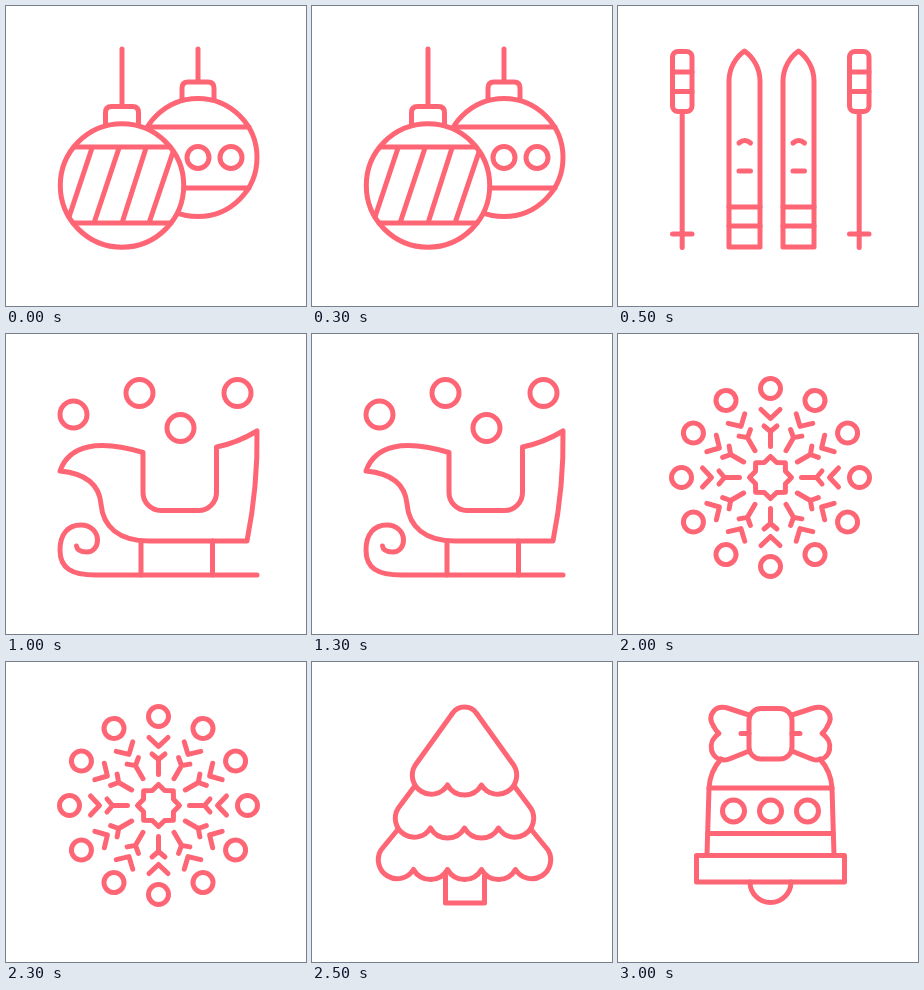
Recreate the animation shown at these times as an HTML page. Size 300 px wide and 300 px high, loop 3500 ms.

```html
<!DOCTYPE html>
<html lang="en">
<head>
<meta charset="utf-8">
<title>Winter icons</title>
<style>
html, body { margin: 0; width: 100%; height: 100%; overflow: hidden; background: #fff; }
svg { display: block; width: 100%; height: 100%; }
</style>
</head>
<body>
<svg id="stage" viewBox="0 0 300 300" fill="none" stroke="#ff6675" stroke-width="5"
  stroke-linecap="round" stroke-linejoin="round"></svg>
<script>
const HOLD = 500;
const MID = 152.5;

const path = (d, extra = '') => `<path d="${d}" ${extra}/>`;
const circle = (x, y, r, extra = '') => `<circle cx="${x}" cy="${y}" r="${r}" ${extra}/>`;
const rect = (x, y, w, h, r = 0) => `<rect x="${x}" y="${y}" width="${w}" height="${h}" rx="${r}"/>`;
const shift = (s, dx) => `<g transform="translate(${dx} 0)">${s}</g>`;
const both = s => s + `<g transform="translate(${2 * MID} 0) scale(-1 1)">${s}</g>`;

function baubles() {
  const cap = (x, y, w) =>
    path(`M${x} 43V${y}M${x - w} ${y + 18}V${y + 6}q0-6 6-6h${2 * w - 12}q6 0 6 6v12`);
  const back = circle(192, 151.5, 59) + cap(192, 76, 16) +
    path('M142 121H243M179 182H243') +
    circle(192, 151.5, 11) + circle(225, 151.5, 11);
  const front = circle(116, 179.5, 61.7, 'fill="#fff"') + cap(116, 100.5, 16.5) +
    path('M68 141H164M67 217H165M86 142L63 211M113 142L88 217M140 142L116 217M167 146L143 217');
  return back + front;
}

function skis() {
  const pole = rect(54.5, 45.5, 19.5, 60, 5.5) +
    path('M54.5 66H74M54.5 85.5H74M64.2 106V241.5M54.5 228H74');
  const ski = path('M111 241V75C111 62 118 51 126.5 45C135 51 142 62 142 75V241Z') +
    path('M111 201H142M111 220H142M121 165H132.5M121 137Q126.7 132 132.5 137');
  return pole + shift(pole, 177) + ski + shift(ski, 54);
}

function sleigh() {
  const balls = [[67.5, 80.5], [133.5, 59], [231.5, 59], [174.5, 94]];
  return balls.map(([x, y]) => circle(x, y, 13.5)).join('') +
    path('M54 137C63 111 92 105 137 118.5V158a18 18 0 0 0 18 18.5H192a18 18 0 0 0 18.5-18.5V113Q231 109 251 97Q252 152 241 207H143C113 207 97 193 95 170C93 148 76 139 54 137Z') +
    path('M251 241H90C65 241 54 234 54 216C54 200 62 191 75 191C85 191 91.5 198 91.5 206C91.5 213 87 218 81 218C75 218 71 216 70.5 212') +
    path('M135 207V241M206.5 207V241');
}

function reindeer() {
  const side =
    path('M102 115Q85 103 54 111C63 127 73 136 93 134') +
    path('M116 97Q107 88 105.5 77L120 71.5C129 67 124 52 114 57L102.500 64.500V54a9 9 0 0 0-18 0L88 69L77 65.500C66 63 61 77 73 79.500L90 82L94 94L79 94C70 95 67 102 73 106') +
    path('M117 141a10.700 10.700 0 0 1 21.400 0');
  return both(side) +
    path('M152.5 84C191 84 221 135 221 174C221 215 190 241.5 152.5 241.5C115 241.5 84 215 84 174C84 135 114 84 152.5 84Z') +
    circle(MID, 188.5, 16);
}

function snowflake() {
  const arm = circle(0, -89, 10) +
    path('M-9.5-68L0-59L9.5-68M0-31V-46M-6.5-51.5L0-46L6.5-51.5');
  let out = '';
  for (let a = 0; a < 360; a += 30) out += `<g transform="rotate(${a})">${arm}</g>`;
  const star = Array.from({ length: 16 }, (_, i) => {
    const r = i % 2 ? 16.2 : 21, a = i * Math.PI / 8;
    return `${(r * Math.sin(a)).toFixed(2)} ${(-r * Math.cos(a)).toFixed(2)}`;
  });
  return `<g transform="translate(${MID} 143.5)">${out}${path('M' + star.join('L') + 'Z')}</g>`;
}

function tree() {
  // One tier: a side slope, an end lobe, n - 1 scallops, then the mirror of it
  const tier = (n, y, top) => {
    const x = MID - 17 * (n - 1), end = x - 32.5, slope = y - 19.5;
    let d = `M${top[0]} ${top[1]}L${end} ${slope}A18.8 18.8 0 0 0 ${x} ${y}`;
    for (let i = 1; i < n; i++) d += `A19.5 19.5 0 0 0 ${x + 34 * i} ${y}`;
    return path(d + `A18.8 18.8 0 0 0 ${2 * MID - end} ${slope}L${2 * MID - top[0]} ${top[1]}`);
  };
  return tier(2, 123, [140, 52]) + path('M140 52A14.7 14.7 0 0 1 165 52') +
    tier(3, 166, [102, 125]) + tier(4, 207.5, [85, 168.5]) +
    path('M133.5 213V241H172.500V213');
}

function bell() {
  const side =
    path('M131 53L111 46.500C97 42 88 53 96 65Q98 69 101 71.500C88 80 92 98 107 98Q110 98 131 89') +
    path('M123 71.500H131M103 97C95 106 91.500 117 91 126L89 193');
  return both(side) + rect(131, 46.5, 43, 50.5, 12) +
    path('M91 126H214M90 171.500H215M132 220A20.500 20.500 0 0 0 173 220') +
    [-37, 0, 37].map(dx => circle(MID + dx, 149, 11)).join('') +
    rect(78.5, 193.5, 148, 26.5);
}

const stage = document.getElementById('stage');
const icons = [baubles, skis, sleigh, reindeer, snowflake, tree, bell];
stage.innerHTML = icons.map(draw => `<g visibility="hidden">${draw()}</g>`).join('');
const groups = [...stage.children];

function show(ms) {
  const current = Math.floor(ms / HOLD) % groups.length;
  groups.forEach((g, i) => g.setAttribute('visibility', i === current ? 'visible' : 'hidden'));
}

let start = null;
function tick(now) {
  if (start === null) start = now;
  show(Math.max(0, now - start));
  requestAnimationFrame(tick);
}
show(0);
requestAnimationFrame(tick);
</script>
</body>
</html>
```
